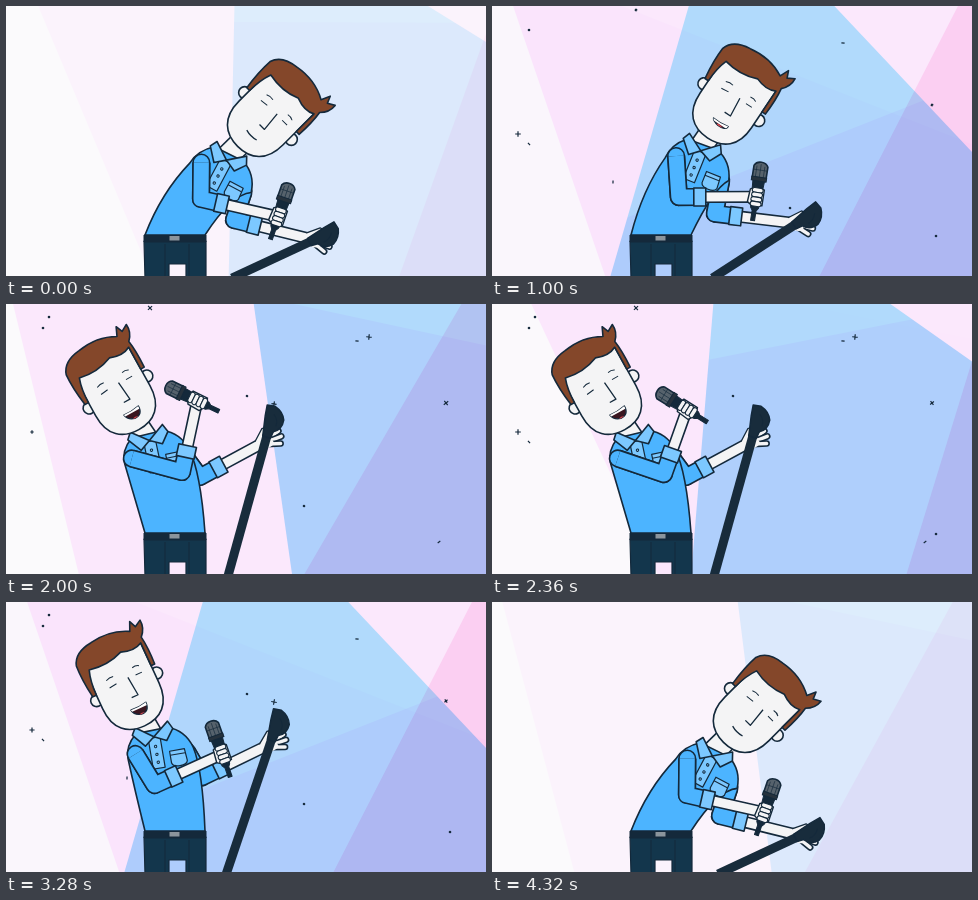
An HTML page with a canvas that plays this animation: 480 px wide and 270 px high, repeating every 4360 ms.

```html
<!DOCTYPE html>
<html lang="en">
<head>
<meta charset="utf-8">
<title>Singer</title>
<style>
html, body { margin: 0; width: 100%; height: 100%; overflow: hidden; background: #fbfafc; }
canvas { display: block; width: 100vw; height: 100vh; }
</style>
</head>
<body>
<canvas id="stage" width="480" height="270"></canvas>
<script>
const c = document.getElementById('stage').getContext('2d');
const LOOP = 4360, STEP = 40, SWAY = 2280;
const INK = '#14293b', SKIN = '#f4f4f5', SHIRT = '#4cb4ff', TRIM = '#7cc8ff', HAIR = '#84472a', CLOTH = '#13364c', METAL = '#182c3c';

// Each part sweeps a quadratic curve: leaning left, control point, leaning right.
const RIG = {
  head: [[112, 88], [187, 58], [262, 110]],
  tilt: [[-29], [8], [45]],
  neck: [[140, 130], [181, 112], [222, 147]],
  twist: [[-12], [8], [28]],
  nearElbow: [[140, 186], [168, 186], [195, 193]],
  farElbow: [[194, 173], [211, 193], [228, 214]],
  mic: [[212, 138], [238, 108], [281, 185]],
  micTurn: [[80], [72], [109]],
  poleTop: [[267, 110], [319, 160], [325, 226]],
  poleFoot: [[222, 272], [205, 272], [226, 272]]
};
const RAISED = { mic: [167, 85], micTurn: [26], nearElbow: [176, 168] };

const SPECKS = [[26, 128], [43, 13], [121, 176], [144, 4], [241, 92], [37, 138], [363, 33], [298, 202], [351, 37], [440, 99], [444, 230], [433, 238], [268, 100], [37, 24]];
const LOOKS = ['cross', 'dot', 'dash'];

const clamp = u => Math.max(0, Math.min(1, u));
const span = (t, a, b) => clamp((t - a) / (b - a));
const smooth = u => u * u * (3 - 2 * u);
const cubic = u => u < .5 ? 4 * u ** 3 : 1 - 4 * (1 - u) ** 3;
const rad = d => d * Math.PI / 180;
const mix = (a, b, u) => a.map((v, i) => v + (b[i] - v) * u);
const curve = ([a, b, d], u) => mix(mix(a, b, u), mix(b, d, u), u);
const toward = (a, b, d) => mix(a, b, d / (Math.hypot(b[0] - a[0], b[1] - a[1]) || 1));
const heading = (a, b) => Math.atan2(b[1] - a[1], b[0] - a[0]);
const swing = (t, mid, reach, peak) => mid + reach * Math.cos(2 * Math.PI * (t - peak) / SWAY);

const lean = t => 1 - cubic(span(t, 530, 1930)) + smooth(span(t, 2500, 4340)) ** 3;
const raise = t => smooth(span(t, 1360, 2000)) - smooth(span(t, 2000, 3720));
const glow = t => clamp(Math.min(t / 400, (4320 - t) / 360));

function spin(o, deg, [x, y]) {
  const s = Math.sin(rad(deg)), k = Math.cos(rad(deg));
  return [o[0] + x * k - y * s, o[1] + x * s + y * k];
}

function trace(points, closed) {
  c.beginPath();
  points.forEach(p => c.lineTo(...p));
  if (closed) c.closePath();
}

function paint(fill, width = 1.6) {
  if (fill) { c.fillStyle = fill; c.fill(); }
  c.lineWidth = width;
  c.strokeStyle = INK;
  if (width) c.stroke();
}

function shape(d, fill, width = 1.6) {
  const p = new Path2D(d);
  if (fill) { c.fillStyle = fill; c.fill(p); }
  c.lineWidth = width;
  c.strokeStyle = INK;
  if (width) c.stroke(p);
}

function dot(x, y, r, fill, width) {
  c.beginPath();
  c.arc(x, y, r, 0, 7);
  paint(fill, width);
}

function at(p, angle, draw) {
  c.save();
  c.translate(...p);
  c.rotate(angle);
  draw();
  c.restore();
}

function tube(points, width, color) {
  for (const [w, s] of [[width + 3.2, INK], [width, color]]) {
    trace(points);
    c.lineWidth = w;
    c.strokeStyle = s;
    c.stroke();
  }
}

// A wedge of light from an apex; angles run from straight down toward the right.
function cone(apex, from, to, color, alpha) {
  const far = a => spin(apex, -a, [0, 1200]);
  trace([apex, far(from), far((from + to) / 2), far(to)], true);
  c.globalAlpha = alpha;
  c.fillStyle = color;
  c.fill();
}

function lights(t, alpha) {
  const blue = swing(t, -6, 16, 1820);
  const wave = Math.tanh(3 * Math.sin(2 * Math.PI * (t - 1180) / SWAY));
  const haze = [400, swing(t, 62, 46, 1080)], level = -5.5 + 18 * wave;
  c.save();
  c.globalCompositeOperation = 'multiply';
  cone([-28, -144], swing(t, 18.5, -12, 1580), 90, '#ffedff', alpha);
  cone([545, -154], -swing(t, 26, 14, 1540), 90, '#ffe4f5', alpha);
  cone(haze, level - 90, level + 90, '#f9f0fd', alpha * .3 * Math.max(0, -wave));
  cone([231, -118], blue, blue + 59.5, '#b4f0ff', alpha);
  c.clip();
  at(haze, rad(level), () => {
    c.fillStyle = '#fcf4ff';
    c.fillRect(-900, 0, 1800, 900);
  });
  c.restore();
}

function specks(t, alpha) {
  c.lineCap = 'butt';
  SPECKS.forEach((p, i) => {
    const size = clamp(.9 + Math.sin(4 * Math.PI * t / LOOP + i * 2.4));
    const look = LOOKS[i % 3];
    c.globalAlpha = size > .2 ? alpha : 0;
    at(p, i * .8, () => {
      if (look === 'dot') return dot(0, 0, .7, null, 1.2);
      const r = look === 'dash' ? 1.6 : 1 + 1.8 * size;
      shape(`M${-r} 0H${r}` + (look === 'cross' ? `M0 ${-r}V${r}` : ''), null, 1.2);
    });
  });
  c.globalAlpha = 1;
}

function legs() {
  shape('M138 235H200V272H180V258H163V272H139Z', CLOTH, 1.2);
  shape('M159 238V272M183 238V272', null, 1);
  shape('M138 229H200V236H138Z', INK, 1);
  shape('M163 229.5H174V235H163Z', '#8b949c', 1);
}

function torso(neck, turn, q) {
  const p = (x, y) => spin(neck, turn, [x, y]);
  const hip = [139, 229], left = p(-28, 12), right = p(39, 24);
  const side = mix(hip, left, .5), top = mix(left, hip, .15);
  c.beginPath();
  c.moveTo(...hip);
  c.quadraticCurveTo(side[0] - 10 * q, side[1], ...top);
  c.quadraticCurveTo(...left, ...p(-15, 1));
  c.lineTo(...p(17, 0));
  c.quadraticCurveTo(...p(34, 6), ...right);
  c.quadraticCurveTo(...mix(right, [206, 190], .5), 199, 229);
  c.closePath();
  paint(SHIRT);
  at(neck, rad(turn), () => {
    shape('M-4 8H8V39H-4Z', TRIM, 1.2);
    for (const y of [17, 25, 33]) dot(2, y, 1.2, null, 1);
    shape('M15 24H30L31 36Q30 40 23 40Q16 40 15 36Z', TRIM, 1.2);
    shape('M15 28H30', null, 1);
    shape('M-15 -5L2 7L-8 15L-19 2Z', TRIM);
    shape('M18 -6L2 7L14 13L22 2Z', TRIM);
  });
}

function smile(open) {
  const d = open * 9;
  if (d < 1) return shape('M-5 25Q2 27 9 25', null, 1.3);
  const lips = `M-6 23Q2 24 11 22Q11 ${24 + d} 2 ${24 + d * .9}Q-5 ${23 + d * .8} -6 23Z`;
  c.save();
  shape(lips, '#3a1620', 1.3);
  c.clip(new Path2D(lips));
  shape('M-6 21H11V25H-6Z', '#fff', 0);
  dot(3, 26 + d, 4, '#d8464f', 0);
  c.restore();
}

function head(pos, turn, open) {
  at(pos, rad(turn), () => {
    dot(-33, 0, 6, SKIN);
    dot(33, 0, 6, SKIN);
    shape('M-31 -34V10C-31 33 -18 43 0 43S31 33 31 10V-36Z', SKIN);
    shape('M-31 -5H-35Q-38 -25 -37 -40Q-33 -53 -14 -55Q8 -59 26 -49L30 -58L33 -51L40 -55Q41 -46 34 -39Q36 -27 35 -9H31V-34Q22 -29 9 -34Q-8 -27 -27 -31Q-31 -20 -31 -5Z', HAIR);
    shape('M-16 -6L-8 -7M13 -7L20 -7M-16 -14Q-12 -16 -8 -15M13 -15Q17 -16 20 -14', null, 1);
    shape('M5 -8L7 12L0 12', null, 1.3);
    smile(open);
  });
}

function arm(shoulder, elbow, hand) {
  const wrist = toward(elbow, hand, 21);
  c.lineCap = 'round';
  tube([wrist, hand], 9, SKIN);
  tube([shoulder, elbow], 15, SHIRT);
  c.lineCap = 'butt';
  tube([shoulder, elbow, wrist], 15, SHIRT);
  at(wrist, heading(elbow, hand), () => shape('M-6 -9H6V9H-6Z', TRIM));
}

function mic(pos, turn) {
  at(pos, rad(turn), () => {
    shape('M9 -6L38 -4L41 -2H51V2H41L38 4L9 6Z', INK, 1);
    shape('M-4 -7Q-8 -5 -8 0T-4 7L8 7V-7Z', '#56626c');
    shape('M-4 -4H8M-6 0H8M-4 4H8M0 -7V7', null, .6);
    shape('M7 -7.5H11V7.5H7Z', '#26323d', 1);
  });
}

function grip(pos, angle) {
  at(pos, angle, () => {
    shape('M-8 -7Q-11 0 -7 7L6 8Q10 4 8 -7Z', SKIN, 1.4);
    for (let x = -9; x <= 5; x += 4.6) {
      c.beginPath();
      c.roundRect(x, -6, 4.6, 11, 2.3);
      paint(SKIN, 1.1);
    }
  });
}

function openHand(pos, angle) {
  at(pos, angle, () => {
    c.lineCap = 'round';
    for (let i = 0; i < 4; i++) tube([[0, 2 * i - 3], [17 - 2 * (i - 1.5) ** 2, 6 * i - 9]], 3.4, SKIN);
    shape('M-9 -5Q0 -10 7 -5L7 6Q-1 9 -9 5Z', SKIN, 0);
    shape('M-9 -5Q-3 -9 3 -13Q7 -13 4 -8', SKIN, 1.3);
  });
}

function pole(foot, top) {
  c.lineCap = 'butt';
  trace([foot, top]);
  c.lineWidth = 9;
  c.strokeStyle = METAL;
  c.stroke();
  at(top, heading(foot, top), () => {
    shape('M-24 -4L-4 -7L7 -8L8 0Q5 9 -3 12Q-13 13 -17 5L-24 4Z', METAL, 1.5);
    shape('M-11 6Q-5 7 0 1', null, 1);
  });
}

function singer(t) {
  const q = lean(t), r = raise(t), pose = {};
  for (const part in RIG) {
    const p = curve(RIG[part], q);
    pose[part] = RAISED[part] ? mix(p, RAISED[part], r) : p;
  }
  const { neck, poleTop, poleFoot, farElbow, nearElbow } = pose;
  const [tilt] = pose.tilt, [twist] = pose.twist, [micTurn] = pose.micTurn;
  const hold = mix(poleFoot, poleTop, .83), fist = spin(pose.mic, micTurn, [27, 0]);
  legs();
  arm(spin(neck, twist, [32, 27]), farElbow, hold);
  openHand(hold, heading(farElbow, hold));
  pole(poleFoot, poleTop);
  tube([spin(pose.head, tilt, [0, 30]), spin(neck, twist, [0, 6])], 21, SKIN);
  torso(neck, twist, q);
  head(pose.head, tilt, .9 * Math.sqrt(clamp(1 - q)));
  arm(spin(neck, twist, [-19, 21]), nearElbow, fist);
  mic(pose.mic, micTurn);
  grip(fist, rad(micTurn));
}

function draw(now) {
  const t = Math.floor(now % LOOP / STEP) * STEP;
  c.fillStyle = '#fbfafc';
  c.fillRect(0, 0, 480, 270);
  c.lineJoin = 'round';
  lights(t, .4 + .6 * glow(t));
  specks(t, glow(t));
  singer(t);
}

let start;
function tick(now) {
  start ??= now;
  draw(now - start);
  requestAnimationFrame(tick);
}
draw(0);
requestAnimationFrame(tick);
</script>
</body>
</html>
```
